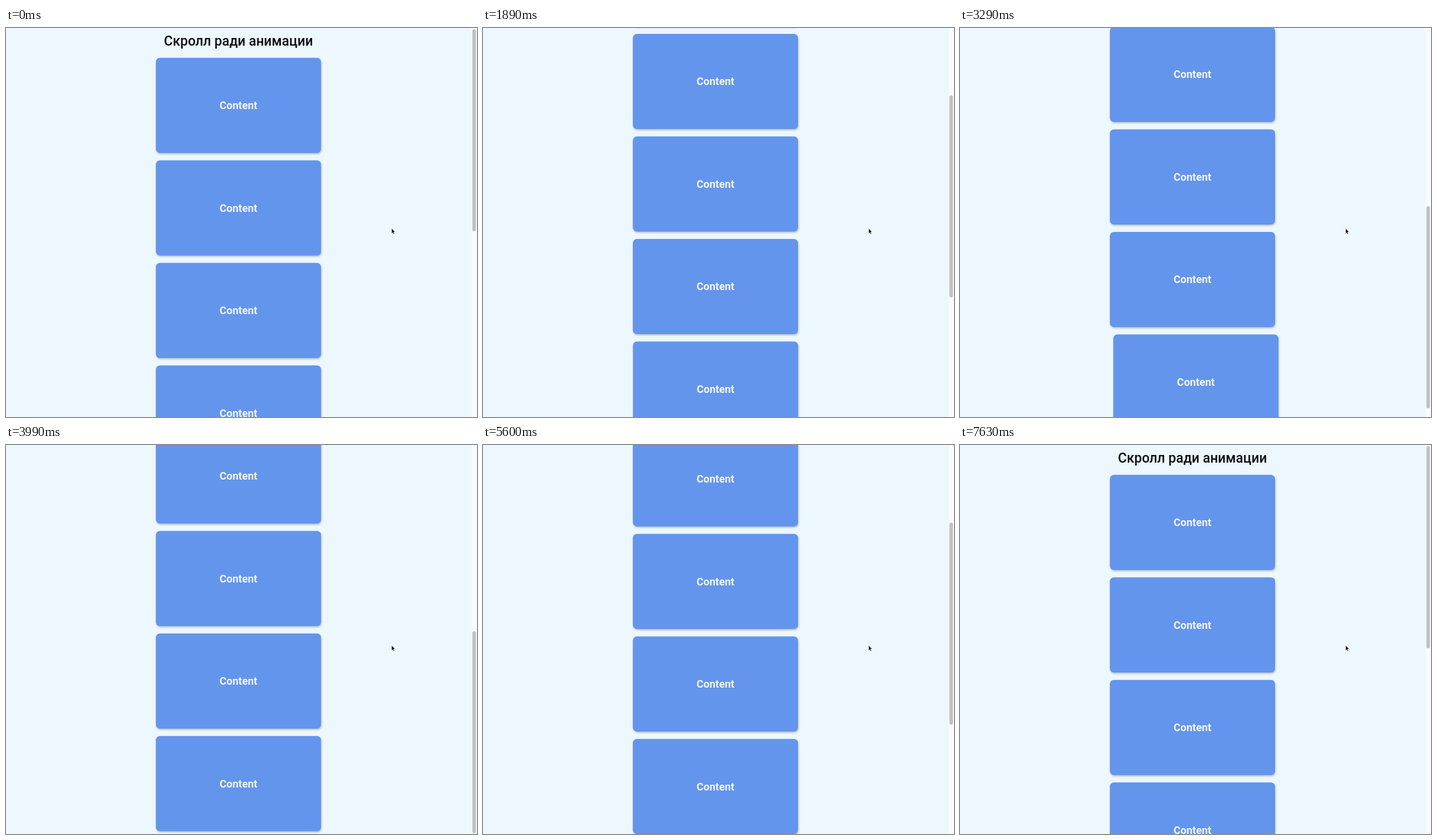
An HTML page for the animation above (7.98 s loop, 800 by 662 pixels).

```html
<!DOCTYPE html>
<html lang="ru">
<head>
<meta charset="utf-8">
<title>Скролл ради анимации</title>
<style>
  html, body { margin: 0; width: 100%; height: 100%; overflow: hidden; background: #edf7fe; }
  svg { display: block; width: 100%; height: 100%; }
  text { font-family: Roboto, sans-serif; text-anchor: middle; }
  .title { font-size: 23px; font-weight: 500; fill: #0b0d10; }
  .label { font-size: 18px; font-weight: 700; fill: #f1f6fe; }
  .card { fill: #6495ec; filter: drop-shadow(1.4px 2.8px 1.7px rgba(0, 0, 0, .22)); }
</style>
</head>
<body>
<svg viewBox="0 0 800 662">
  <rect width="800" height="662" fill="#edf7fe"/>
  <g id="page">
    <text class="title" x="394.8" y="29.5">Скролл ради анимации</text>
  </g>
  <rect x="791" width="9" height="662" fill="#f8fbfe"/>
  <rect id="thumb" x="792.2" width="6" height="344" rx="3" fill="#c1c1c1"/>
  <path d="M655 340.8v9l2-1.7 1.3 2.9 1.5-.7-1.3-2.8h2.5z" fill="#111" stroke="#fff" stroke-width=".6"/>
</svg>
<script>
const LOOP = 7980, STEP = 70, TURN = 3990;
const CARDS = 7, FIRST = 50.7, PITCH = 174.5, TRIGGER = 586;
const SLIDE = 1120, SLIDE_MS = 400;

// Scroll keys: time, offset, speed
const keys = [
  [0, 0, 0.05], [1120, 129, 0.08], [2660, 424.5, 0.4], [TURN, 602.5, 0],
  [4970, 420, -0.25], [6230, 86.5, -0.22], [6720, 10, -0.03], [7560, 0, 0]
];

function scrollAt(t) {
  const i = keys.findIndex(k => k[0] > t);
  if (i < 0) return 0;
  const [t0, a, va] = keys[i - 1], [t1, b, vb] = keys[i];
  const d = t1 - t0, u = (t - t0) / d, w = 1 - u;
  return a * w * w * (1 + 2 * u) + b * u * u * (3 - 2 * u) + d * u * w * (va * w - vb * u);
}

// Time in [lo, hi] at which the scroll passes a level
function crossing(level, lo, hi) {
  const rising = scrollAt(hi) > scrollAt(lo);
  for (let i = 0; i < 30; i++) {
    const mid = (lo + hi) / 2;
    if ((scrollAt(mid) < level) === rising) lo = mid; else hi = mid;
  }
  return lo;
}

// cubic-bezier(.25, .1, .25, 1)
function ease(x) {
  if (x <= 0) return 0;
  if (x >= 1) return 1;
  const bez = (p, q, s) => 3 * p * s * (1 - s) ** 2 + 3 * q * s * s * (1 - s) + s ** 3;
  let lo = 0, hi = 1;
  for (let i = 0; i < 24; i++) {
    const mid = (lo + hi) / 2;
    if (bez(.25, .25, mid) < x) lo = mid; else hi = mid;
  }
  return bez(.1, 1, lo);
}

function make(tag, attrs, parent) {
  const el = document.createElementNS("http://www.w3.org/2000/svg", tag);
  for (const name in attrs) el.setAttribute(name, attrs[name]);
  return parent.appendChild(el);
}

const page = document.getElementById("page");
const thumb = document.getElementById("thumb");

const cards = Array.from({ length: CARDS }, (_, i) => {
  const top = FIRST + i * PITCH, level = top - TRIGGER;
  const el = make("g", {}, page);
  make("rect", { class: "card", x: 254.5, width: 280.6, height: 162, rx: 7 }, el);
  make("text", { class: "label", x: 394.8, y: 87.4 }, el).textContent = "Content";
  return {
    el, top,
    side: i % 2 ? -1 : 1,
    enter: level > 0 ? crossing(level, 0, TURN) : -LOOP,
    leave: level > 0 ? crossing(level, TURN, 7560) : 2 * LOOP
  };
});

function draw(t) {
  const y = scrollAt(t);
  page.setAttribute("transform", `translate(0 ${-y})`);
  thumb.setAttribute("y", 2 + y * 0.5228);
  for (const c of cards) {
    const shown = ease((t - c.enter) / SLIDE_MS) - ease((t - c.leave) / SLIDE_MS);
    c.el.setAttribute("transform", `translate(${c.side * SLIDE * (1 - shown)} ${c.top})`);
  }
}

const start = performance.now();
function tick() {
  const t = (performance.now() - start) % LOOP;
  draw(Math.floor(t / STEP) * STEP);
  requestAnimationFrame(tick);
}
tick();
</script>
</body>
</html>
```
